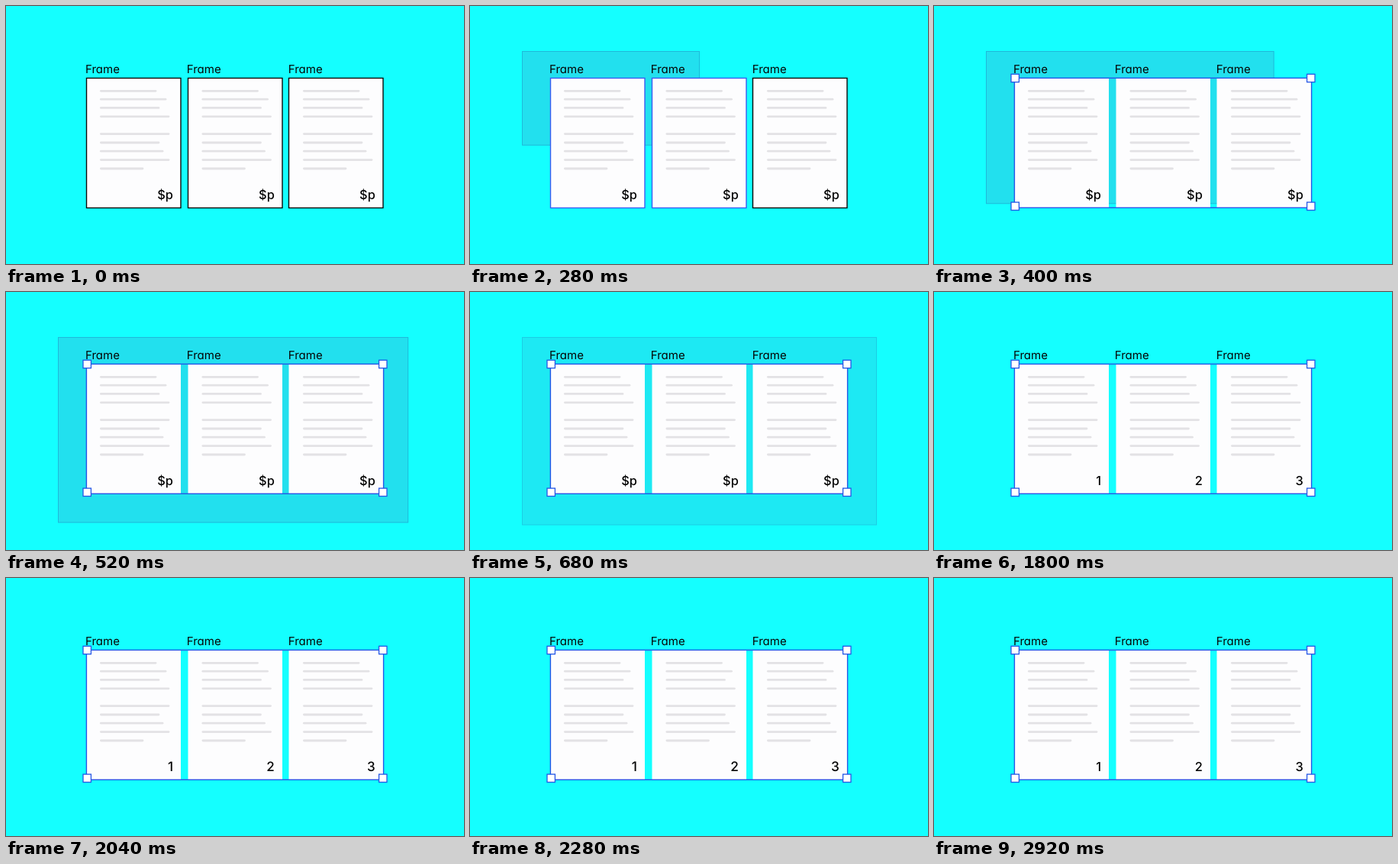
Write an HTML page that moves like this. It is 600 by 338 pixels and loops after 3400 ms.

```html
<!DOCTYPE html>
<html lang="en">
<head>
<meta charset="utf-8">
<title>Page numbers</title>
<style>
html, body { margin: 0; width: 100%; height: 100%; overflow: hidden; background: #14ffff; }
svg { display: block; width: 100%; height: 100%; }
text { font-family: Inter, "Open Sans", sans-serif; fill: #050505; text-rendering: geometricPrecision; }
.label { font-size: 15px; font-feature-settings: "cv11"; }
.num { font-size: 16.4px; font-weight: 500; text-anchor: end; }
.line { stroke: #e3e2e5; stroke-width: 2.8; stroke-linecap: round; }
.handle { fill: #fff; stroke: #2456e6; stroke-width: 1.3; }
</style>
</head>
<body>
<svg id="stage" viewBox="0 0 600 338">
  <rect width="600" height="338" fill="#14ffff"/>
  <rect id="marquee" x="68.5" y="59.5" fill="#22e0ee" stroke="#1fb9d9"/>
</svg>
<script>
const LOOP = 3400;
const BLUE = '#2456e6';
const stage = document.getElementById('stage');
const marquee = document.getElementById('marquee');

function add(parent, tag, attrs, text) {
  const el = document.createElementNS('http://www.w3.org/2000/svg', tag);
  for (const k in attrs) el.setAttribute(k, attrs[k]);
  if (text) el.textContent = text;
  parent.appendChild(el);
  return el;
}

// Vertical position and length of each text line on a page
const LINES = [[111.3, 74], [122.2, 87], [133.4, 78], [144.8, 91],
  [167.6, 91], [179, 78], [190.2, 83], [201.6, 91], [213, 57]];

const pages = [105, 238, 370].map((x, i) => {
  const g = add(stage, 'g', {});
  const paper = add(g, 'rect', { x: x + 0.5, y: 94.5, width: 123.5, height: 170, fill: '#fdfdfe', 'stroke-width': 1.4 });
  const left = [123, 256.5, 389][i];
  for (const [y, w] of LINES) {
    add(g, 'line', { class: 'line', x1: left + 1.4, x2: left + w - 1, y1: y, y2: y });
  }
  add(g, 'text', { class: 'label', x: [104, 236.8, 369.8][i], y: 88 }, 'Frame');
  const right = [219, 351.8, 483.8][i];
  const num = add(g, 'text', { class: 'num', x: 0, y: 0 }, '$p');
  return { x, paper, num, right };
});

const group = add(stage, 'g', {});
add(group, 'rect', { x: 105.4, y: 94.4, width: 389.2, height: 169.9, fill: 'none', stroke: BLUE, 'stroke-width': 1.4 });
for (const x of [106.2, 493.8]) {
  for (const y of [94.5, 262.3]) {
    add(group, 'rect', { class: 'handle', x: x - 5.2, y: y - 5.2, width: 10.4, height: 10.4 });
  }
}

const clamp = v => Math.max(0, Math.min(1, v));
const ease = v => (1 - Math.cos(Math.PI * clamp(v))) / 2;

function draw(t) {
  // Drag out the marquee, then fade it
  const p = ease(t / 560);
  const w = 464 * p, h = 245.5 * p;
  marquee.setAttribute('width', w);
  marquee.setAttribute('height', h);
  marquee.setAttribute('opacity', t > 0 ? clamp((960 - t) / 400) : 0);

  const hit = x => 68.5 + w > x && 59.5 + h > 94;
  const all = hit(pages[2].x);
  group.style.display = all ? '' : 'none';

  // Numbers replace the placeholder and swell gently
  const numbered = t >= 1800;
  const swell = 1 + 0.06 * (ease((t - 1800) / 400) - ease((t - 2200) / 400));
  pages.forEach((pg, i) => {
    pg.paper.setAttribute('stroke', all ? 'none' : hit(pg.x) ? '#3a5cf0' : '#0a0a0a');
    pg.num.textContent = numbered ? String(i + 1) : '$p';
    pg.num.setAttribute('transform', `translate(${pg.right} 253) scale(${swell})`);
  });
}

const start = performance.now();
function tick() {
  const t = (performance.now() - start) % LOOP;
  draw(Math.floor(t / 40) * 40);
  requestAnimationFrame(tick);
}
draw(0);
requestAnimationFrame(tick);
</script>
</body>
</html>
```
